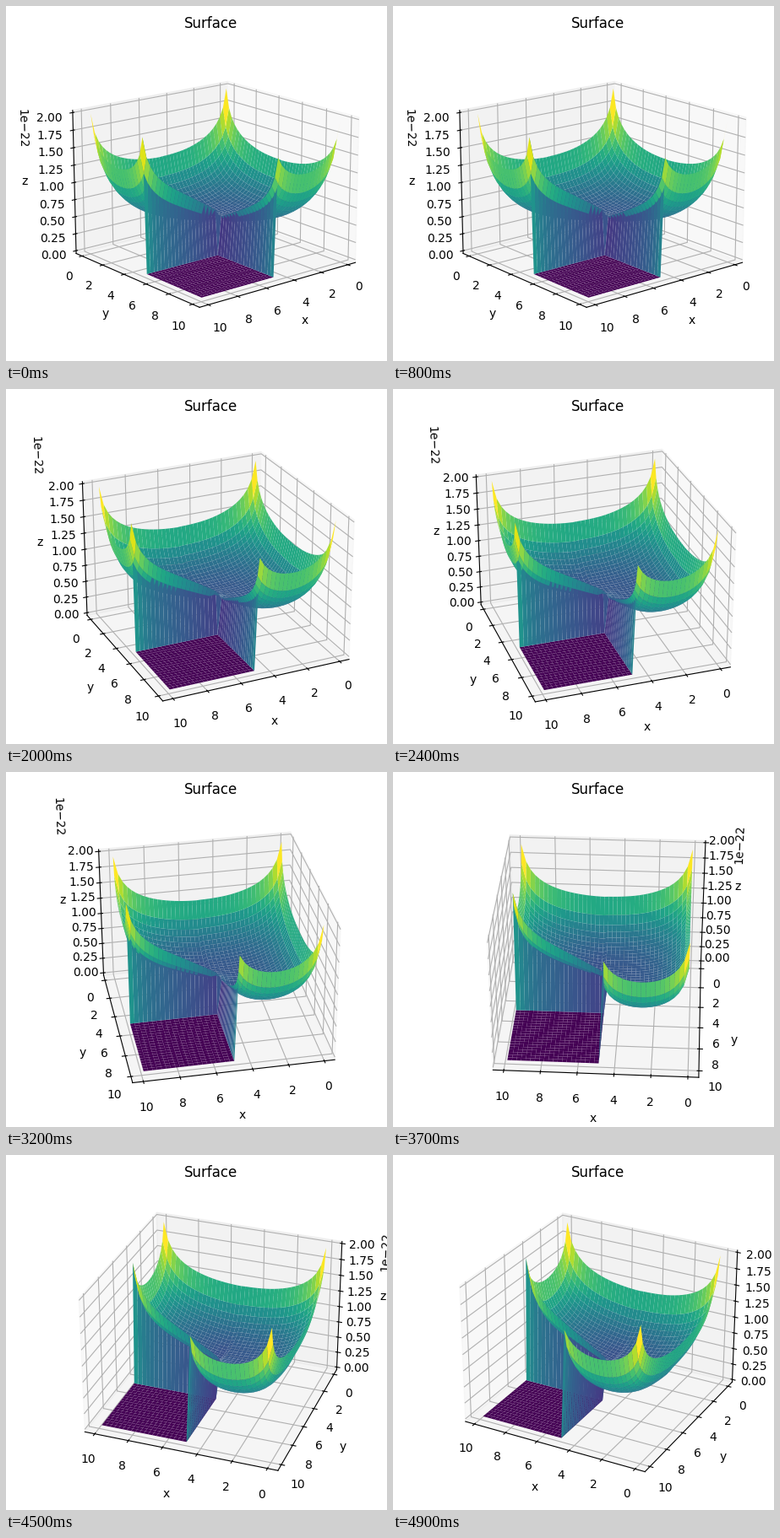
A matplotlib script that plays this animation: 451x421 px, repeating every 5000 ms.

```python
import numpy as np
import matplotlib.pyplot as plt
from matplotlib.animation import FuncAnimation

W, H, DPI = 451, 421, 100
FRAMES, INTERVAL = 50, 100
N = 40
HALF = N // 2
TOP = 1.99e-22

# Hand-held drag of the camera: key frames and angles in degrees
KEYS = [12, 15, 24, 32, 36, 37, 45, 49]
ELEV = [16.6, 21, 28, 31, 32.8, 33.3, 29.6, 27.2]
AZIM = [50.7, 57.4, 71.5, 78.8, 88.8, 93.4, 109.8, 118.2]


def rise(d, span=N):
    """Density added at d cells from the edge of a strip."""
    return 0.3 * np.log((span + 0.6) / (d + 0.6)).clip(0)


def arm(depth, along):
    """Density added by a cut edge that starts at the inner corner."""
    weight = 0.5 + 0.5 * along / np.hypot(along, 14)
    return weight * rise(depth.clip(0), HALF)


def density():
    """Density on an L-shaped plate, zero in the missing quarter."""
    i, j = np.meshgrid(np.arange(N), np.arange(N))
    edge = HALF - 1
    z = rise(i) + rise(j) - 0.49
    z += np.where(j < HALF, rise(N - 1 - i), arm(edge - i, j - edge))
    z += np.where(i < HALF, rise(N - 1 - j), arm(edge - j, i - edge))
    corner = 0.3 * rise(np.hypot(edge - i, edge - j), HALF)
    z += np.where((i < HALF) & (j < HALF), corner, 0)
    z[HALF:, edge:] = 0
    return z * TOP / z.max()


fig = plt.figure(figsize=(W / DPI, H / DPI), dpi=DPI)
ax = fig.add_axes([-6 / W, 16.8 / H, 496 / W, 369.6 / H], projection="3d")

cells = (np.arange(N) + 0.5) * 10 / N
x, y = np.meshgrid(cells, cells)
ax.plot_surface(x, y, density(), cmap="viridis")

ax.set_title("Surface")
ax.set(xlabel="x", ylabel="y", zlabel="z")
ax.set_xticks(range(0, 11, 2))
ax.set_yticks(range(0, 11, 2))
ax.set_zticks(np.arange(9) * 0.25e-22)
ax.set_xlim(-0.586, 10.586)
ax.set_ylim(-0.586, 10.586)
ax.set_zlim(-TOP / 48, TOP * 49 / 48)


def update(k):
    ax.view_init(np.interp(k, KEYS, ELEV), np.interp(k, KEYS, AZIM))
    return []


anim = FuncAnimation(fig, update, frames=FRAMES, interval=INTERVAL,
                     repeat=True, repeat_delay=0, blit=False)
plt.show()
```
